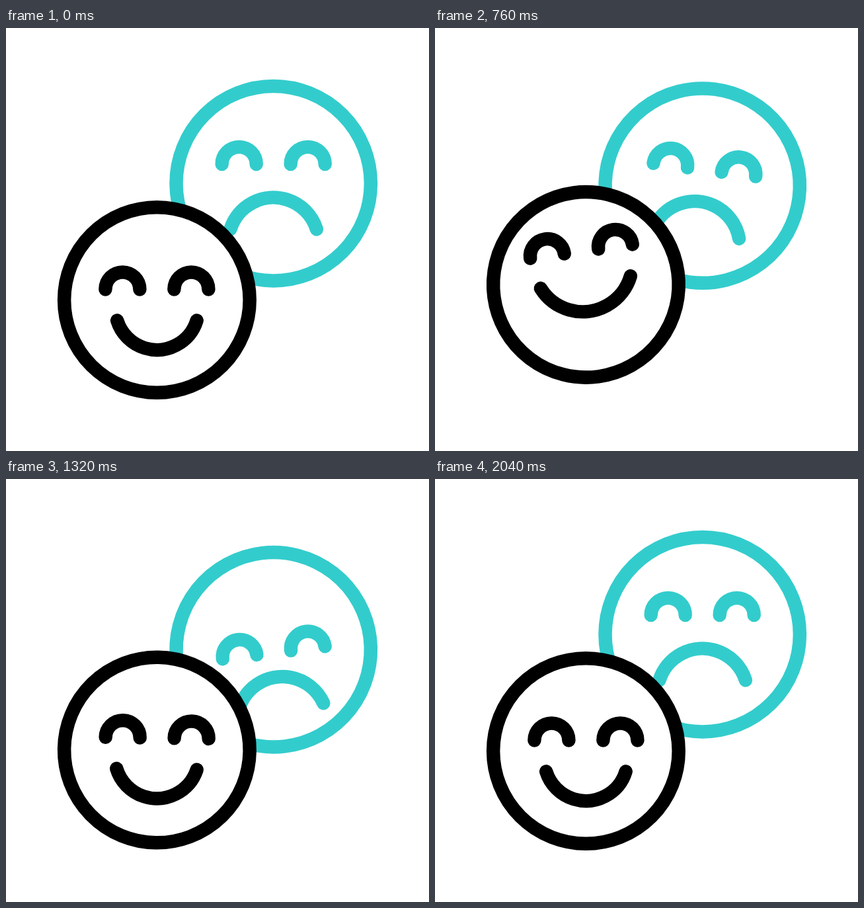
An HTML page with a canvas that plays this animation: 640 px wide and 640 px high, repeating every 2.12 s.

```html
<!DOCTYPE html>
<html lang="en">
<head>
<meta charset="utf-8">
<title>Moods</title>
<style>
  html, body { margin: 0; width: 100%; height: 100%; overflow: hidden; background: #fff; }
  canvas { display: block; width: 100vmin; height: 100vmin; }
</style>
</head>
<body>
<canvas id="stage" width="640" height="640"></canvas>
<script>
const ctx = document.getElementById('stage').getContext('2d');
const LOOP = 2120, STEP = 40;

// Time and value keys, counted from the start of each face's nod
const LIFT = [[0, 0], [690, 1], [710, 1], [1420, 0]];
const TILT = [[0, 0], [360, 12.1], [685, -8], [1005, 3.2], [1440, 0]];

const happy = {
  color: '#000', start: 40, x: 228.4, y: 411.5, r: 140.3, dir: -1,
  eyeY: -16, eyeShift: -34.8, mouthY: 31, mouthShift: -34.8,
  half: 60.25, widen: 8.4, sag: 44.5
};
const sad = {
  color: '#33cccc', start: 560, x: 404.7, y: 235.2, r: 147.2, dir: 1,
  eyeY: -29.2, eyeShift: 34, mouthY: 69.3, mouthShift: 20.4,
  half: 65.25, widen: 0, sag: -48
};

// cubic-bezier(.5, 0, .5, 1)
function ease(x) {
  let lo = 0, hi = 1;
  for (let i = 0; i < 24; i++) {
    const m = (lo + hi) / 2;
    if (1.5 * m * (1 - m) + m * m * m < x) lo = m; else hi = m;
  }
  return lo * lo * (3 - 2 * lo);
}

function track(keys, t) {
  if (t <= keys[0][0]) return keys[0][1];
  for (let i = 1; i < keys.length; i++) {
    const [t0, a] = keys[i - 1], [t1, b] = keys[i];
    if (t < t1) return a + (b - a) * ease((t - t0) / (t1 - t0));
  }
  return keys[keys.length - 1][1];
}

function arc(x, y, r, from, to) {
  ctx.beginPath();
  ctx.arc(x, y, r, from, to);
  ctx.stroke();
}

// Arc over a level chord; a positive sag curves downwards
function mouth(y, half, sag) {
  const s = Math.abs(sag);
  const r = (half * half + s * s) / (2 * s);
  const d = r - s;
  const a = Math.atan2(d, half);
  if (sag > 0) arc(0, y - d, r, a, Math.PI - a);
  else arc(0, y + d, r, Math.PI + a, -a);
}

function drawFace(f, time) {
  const t = time - f.start;
  const q = track(LIFT, t);
  ctx.save();
  ctx.translate(f.x, f.y + f.dir * 23.2 * q);
  ctx.rotate(track(TILT, t) * Math.PI / 180);
  ctx.strokeStyle = f.color;
  ctx.fillStyle = '#fff';
  ctx.lineWidth = 20.5;
  ctx.lineCap = 'round';

  ctx.beginPath();
  ctx.arc(0, 0, f.r, 0, 2 * Math.PI);
  ctx.fill();
  ctx.stroke();

  const eyeY = f.eyeY + f.eyeShift * q;
  for (const x of [-52, 52]) arc(x, eyeY, 26, Math.PI, 2 * Math.PI);
  mouth(f.mouthY + f.mouthShift * q, f.half + f.widen * q, f.sag);
  ctx.restore();
}

function draw(now) {
  const time = Math.floor((now % LOOP) / STEP) * STEP;
  ctx.fillStyle = '#fff';
  ctx.fillRect(0, 0, 640, 640);
  drawFace(sad, time);
  drawFace(happy, time);
  requestAnimationFrame(loop);
}

let origin = null;
function loop(now) {
  if (origin === null) origin = now;
  draw(Math.max(0, now - origin));
}
draw(0);
</script>
</body>
</html>
```
